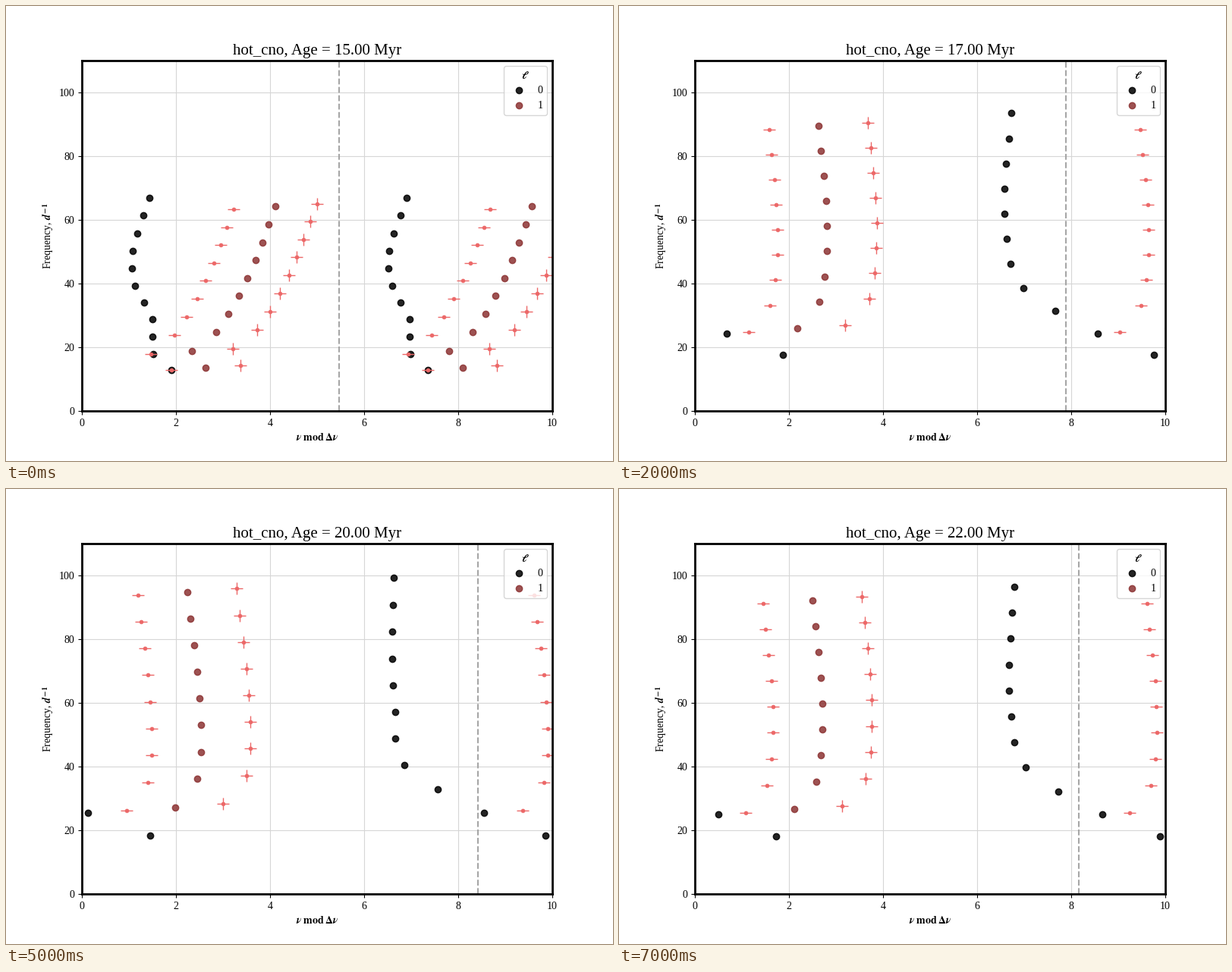
A matplotlib script for the animation above (8 s loop, 800 by 600 pixels).

```python
import numpy as np
import matplotlib.pyplot as plt
from matplotlib.animation import FuncAnimation

plt.rcParams.update({
    "font.family": "Liberation Serif",
    "mathtext.fontset": "stix",
    "axes.linewidth": 2,
    "axes.axisbelow": True,
})

FIRST_AGE, TURN_AGE, FRAMES = 15, 18, 8

# Key shapes of the two ridges at ages 15..18: offset from n * spacing
# at a few radial orders, joined by smooth curves.
RADIAL_KNOTS = np.array([2, 3, 5, 7, 9, 12])
RADIAL = [[1.90, 1.52, 1.50, 1.13, 1.08, 1.44],
          [2.55, 1.74, 1.18, .61, .61, 1.08],
          [1.87, .68, -.91, -1.26, -1.31, -1.16],
          [1.16, -.235, -1.985, -2.09, -2.145, -2.205]]
DIPOLE_KNOTS = np.array([2, 3, 4, 7, 11])
DIPOLE = [[2.63, 2.34, 2.85, 3.52, 4.11],
          [2.63, 2.65, 3.11, 3.73, 4.21],
          [2.63, 2.17, 2.65, 2.81, 2.63],
          [2.63, 1.85, 2.32, 2.29, 1.98]]
SPACING = [5.46, 6.32, 7.89, 8.755]
SPLIT = [.885, 1.005, 1.055, 1.04]


def blend(stage, rows):
    i = min(int(stage), len(rows) - 2)
    t = stage - i
    return (1 - t) * np.array(rows[i]) + t * np.array(rows[i + 1])


def smooth(n, knots, values):
    """Cubic Hermite curve through the knots."""
    k, v = np.pad(knots, 1, "edge"), np.pad(values, 1, "edge")
    slope = (v[2:] - v[:-2]) / (k[2:] - k[:-2])
    i = np.clip(np.searchsorted(knots, n, "right") - 1, 0, len(knots) - 2)
    h = knots[i + 1] - knots[i]
    t = (n - knots[i]) / h
    ease = t * t * (3 - 2 * t)
    return ((1 - ease) * values[i] + ease * values[i + 1]
            + h * t * (1 - t) * ((1 - t) * slope[i] - t * slope[i + 1]))


def modes(age):
    """Spacing, radial and dipole frequencies, and dipole splitting."""
    # The model evolves quickly until the turn, then slowly drifts back.
    late = max(age - TURN_AGE, 0)
    stage = min(age, TURN_AGE) - FIRST_AGE - .2 * late
    if late:
        dnu = 7.39 + 1.365 * .75 ** (late / 2)
    else:
        dnu = blend(stage, SPACING)
    n = np.arange(2, 13)
    radial = n * dnu + smooth(n, RADIAL_KNOTS, blend(stage, RADIAL))
    # The lowest dipole mode is present only at the start.
    n = np.arange(2 if age == FIRST_AGE else 3, 12)
    dipole = n * dnu + smooth(n, DIPOLE_KNOTS, blend(stage, DIPOLE))
    split = blend(stage, SPLIT) * (1 - .17 * np.exp(-2 * (n - 2)))
    return dnu, radial, dipole, split


def place(artist, freq, dnu):
    x = freq % dnu
    artist.set_data(np.append(x, x + dnu), np.append(freq, freq))


fig, ax = plt.subplots(figsize=(8, 6), dpi=100)
ax.set_position([.125, .11, .775, .77])
ax.set(xlim=(0, 10), ylim=(0, 110),
       xticks=range(0, 11, 2), yticks=range(0, 101, 20))
ax.grid(color="#d6d6d6", linewidth=.8)
ax.set_xlabel(r"$\mathbfit{\nu}\;\mathbf{mod}\;\mathbf{\Delta}\mathbfit{\nu}$",
              labelpad=4)
ax.set_ylabel(r"Frequency, $\mathbfit{d}^{\,\mathbf{-1}}$", labelpad=3)
title = ax.set_title("", fontsize=15)

edge = ax.axvline(0, color="#a6a6a6", linestyle="--", linewidth=1.5)


def markers(marker, size, color, **style):
    return ax.plot([], [], marker, ms=size, color=color, **style)[0]


def barred(marker):
    red = "#ec6868"
    return [markers(marker, 11.5, red, mew=1), markers("o", 3.4, red, mew=.6)]


radial_dots = markers("o", 6, "black", alpha=.86)
dipole_dots = markers("o", 6, "#8b3131", alpha=.84)
lower, upper = barred("_"), barred("+")

ax.legend([radial_dots, dipole_dots], ["0", "1"],
          title=r"$\mathbf{\ell}$", title_fontsize=10, loc="upper right")


def draw(i):
    age = FIRST_AGE + i
    dnu, radial, dipole, split = modes(age)
    title.set_text(f"hot_cno, Age = {age:.2f} Myr")
    edge.set_xdata([dnu, dnu])
    place(radial_dots, radial, dnu)
    place(dipole_dots, dipole, dnu)
    for artist in lower:
        place(artist, dipole - split, dnu)
    for artist in upper:
        place(artist, dipole + split, dnu)
    return [title, edge, radial_dots, dipole_dots, *lower, *upper]


anim = FuncAnimation(fig, draw, frames=FRAMES, interval=1000,
                     repeat=True, repeat_delay=0, blit=False)
plt.show()
```
